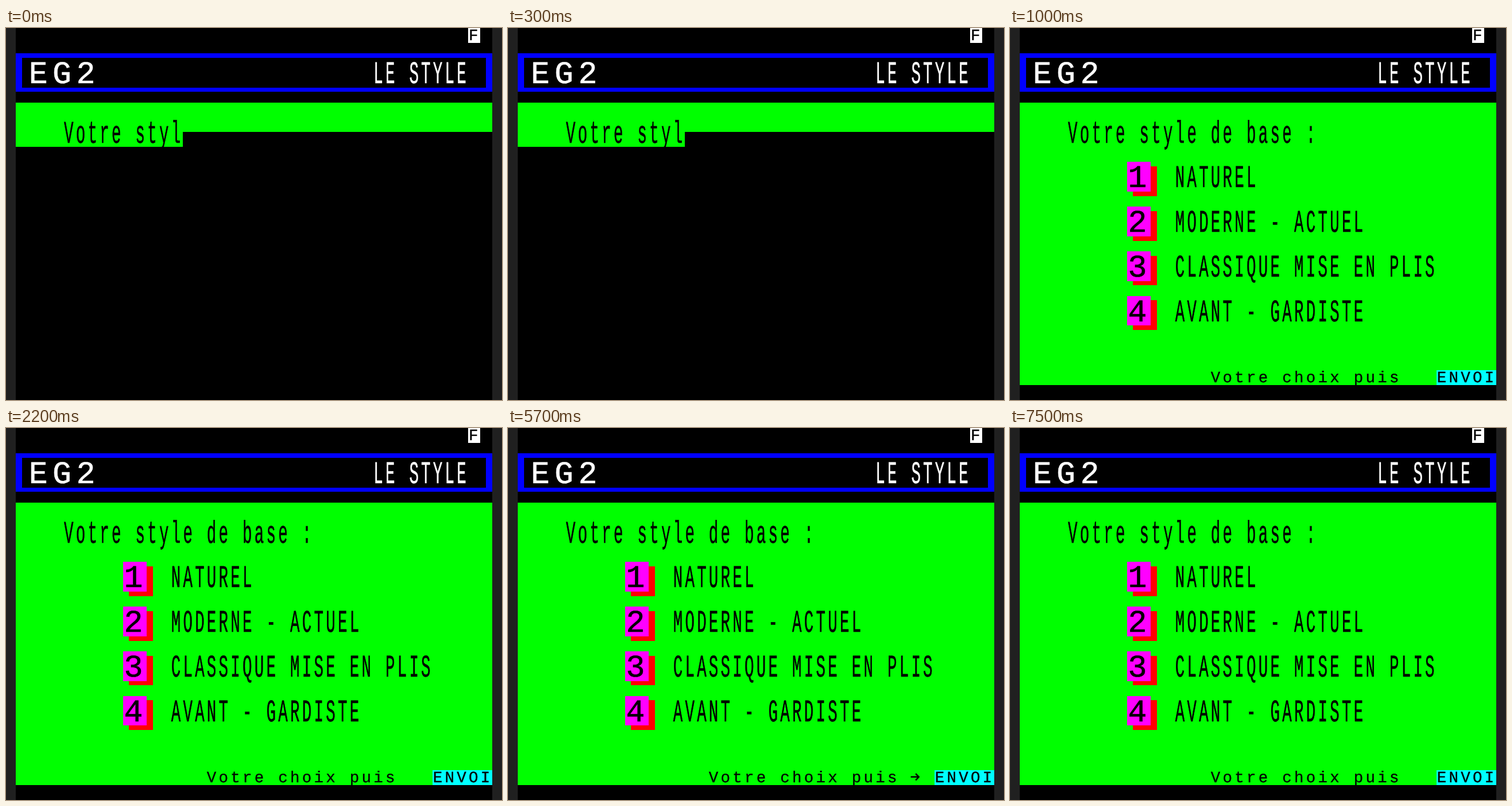
Write an HTML page that moves like this. It is 864 by 648 pixels and loops after 8000 ms.

```html
<!DOCTYPE html>
<html lang="fr">
<head>
<meta charset="utf-8">
<title>Le style</title>
<style>
  html, body { margin: 0; width: 100%; height: 100%; overflow: hidden; background: #202020; }
  svg { display: block; width: 864px; height: 648px; }
  rect { shape-rendering: crispEdges; }
  text {
    font: 10.6px "Liberation Mono", "DejaVu Sans Mono", monospace;
    text-anchor: middle;
    text-rendering: geometricPrecision;
    white-space: pre;
    stroke-width: .12px;
  }
</style>
</head>
<body>
<svg id="stage" viewBox="0 0 864 648">
  <g id="screen" transform="translate(17.28) scale(2.592)"></g>
</svg>
<script>
// The screen is 320 by 250 dots: 40 columns by 25 rows of 8 by 10 dots.
const WIDTH = 320, HEIGHT = 250, CELL_W = 8, CELL_H = 10, LOOP = 8000;
const screen = document.getElementById('screen');

function add(parent, tag, attrs) {
  const el = document.createElementNS('http://www.w3.org/2000/svg', tag);
  for (const [name, value] of Object.entries(attrs)) el.setAttribute(name, value);
  parent.append(el);
  return el;
}

function box(parent, x, y, width, height, fill) {
  return add(parent, 'rect', { x, y, width, height, fill });
}

// Each character is centred in its cell; sx and sy double the cell size.
function write(parent, string, col, row, { sx = 1, sy = 1, fill = '#000' } = {}) {
  const el = add(parent, 'text', {
    x: [...string].map((_, i) => i * CELL_W + 3.5).join(' '),
    y: sy > 1 ? 8.5 : 8,
    transform: `translate(${col * CELL_W} ${row * CELL_H}) scale(${sx} ${sy})`,
    fill,
    stroke: fill
  });
  el.textContent = string;
  return el;
}

const TALL = { sy: 2 };
const BIG = { sx: 2, sy: 2 };

// Fixed header
box(screen, 0, 0, WIDTH, HEIGHT, '#000');
box(screen, 304, 0, 8, 10, '#fff');
write(screen, 'F', 38, 0);
box(screen, 0, 17, WIDTH, 26, '#00f');
box(screen, 4, 20, 312, 20, '#000');
write(screen, 'EG2', 1, 2, { ...BIG, fill: '#fff' });
write(screen, 'LE STYLE', 30, 2, { ...TALL, fill: '#fff' });

// Page body
box(screen, 0, 50, WIDTH, 190, '#0f0');
const heading = 'Votre style de base :';
const headingText = write(screen, heading, 4, 6, TALL);

const choices = ['NATUREL', 'MODERNE - ACTUEL', 'CLASSIQUE MISE EN PLIS', 'AVANT - GARDISTE'];
const choiceGroups = choices.map((label, i) => {
  const row = 9 + 3 * i;
  const y = row * CELL_H;
  box(screen, 76, y + 3, 16, 20, '#f00');
  box(screen, 72, y, 16, 20, '#f0f');
  const group = add(screen, 'g', {});
  write(group, String(i + 1), 9, row, BIG);
  write(group, label, 13, row, TALL);
  return group;
});

const footer = add(screen, 'g', {});
write(footer, 'Votre choix puis', 16, 23);
box(footer, 280, 230, 40, 10, '#0ff');
write(footer, 'ENVOI', 35, 23);
const arrow = add(screen, 'path', {
  transform: 'translate(264 230)',
  d: 'M0 4.5H5.6M3.3 2.3L5.4 4.5L3.3 6.7',
  fill: 'none',
  stroke: '#000'
});

// Black covers over the part that is not written yet
const restOfRow = box(screen, 0, 0, WIDTH, CELL_H, '#000');
const rowsBelow = box(screen, 0, 0, WIDTH, HEIGHT, '#000');

const complete = { row: 24, col: 0, typed: 21, choices: 4, footer: true };
const steps = [
  { at: 0, row: 7, col: 14, typed: 10, choices: 0 },
  { at: 500, row: 19, col: 9, typed: 21, choices: 3 },
  { at: 1000, ...complete },
  { at: 3000, ...complete, arrow: true },
  { at: 7500, ...complete }
];

const show = (el, on) => el.setAttribute('visibility', on ? 'visible' : 'hidden');

function render(step) {
  const x = step.col * CELL_W;
  restOfRow.setAttribute('x', x);
  restOfRow.setAttribute('width', WIDTH - x);
  restOfRow.setAttribute('y', step.row * CELL_H);
  rowsBelow.setAttribute('y', (step.row + 1) * CELL_H);
  headingText.textContent = heading.slice(0, step.typed);
  choiceGroups.forEach((group, i) => show(group, i < step.choices));
  show(footer, step.footer);
  show(arrow, step.arrow);
}

let current;
function tick() {
  const time = performance.now() % LOOP;
  const step = steps.findLast(s => s.at <= time);
  if (step !== current) render(current = step);
  requestAnimationFrame(tick);
}
tick();
</script>
</body>
</html>
```
